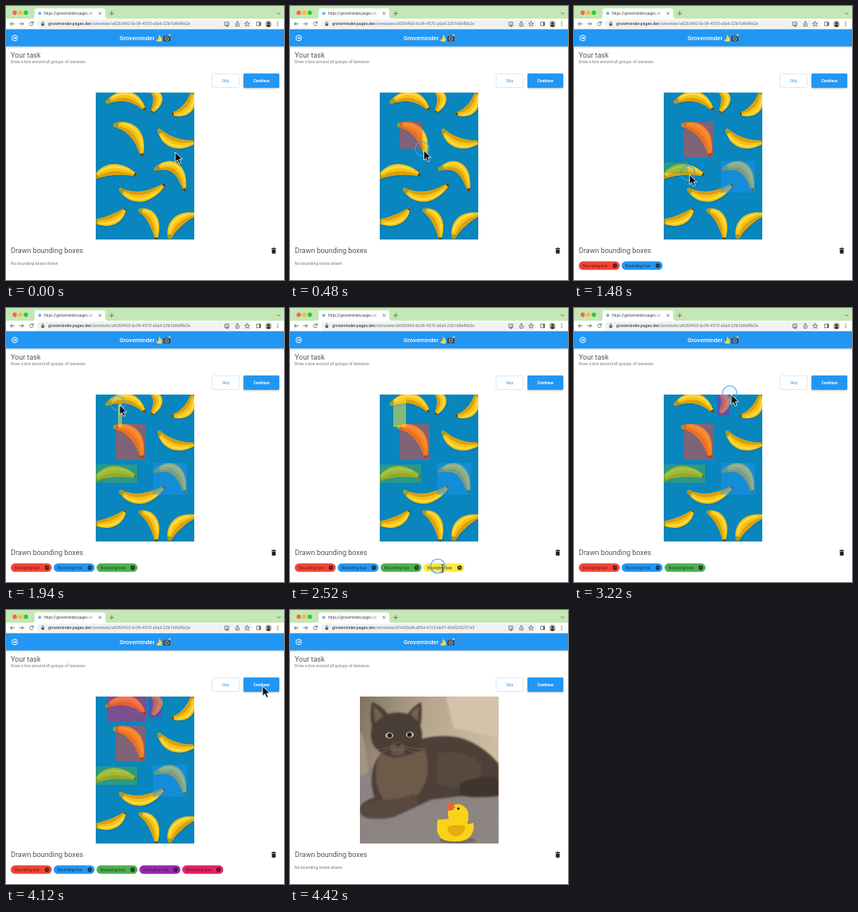
An HTML page that plays this animation: 350x345 px, repeating every 4.48 s.

```html
<!DOCTYPE html>
<html lang="en">
<head>
<meta charset="utf-8">
<title>Annotation demo</title>
<style>
  html, body { margin: 0; width: 100%; height: 100%; overflow: hidden; background: #fff; }
  body > svg { display: block; width: 100vw; height: 100vh; }
  text { font-family: Roboto, sans-serif; }
  .body { font-size: 5px; letter-spacing: .08px; fill: #777; }
  .head { font-size: 9px; fill: #555; }
  .line { fill: none; stroke: #5f6368; stroke-width: .8; stroke-linecap: round; stroke-linejoin: round; }
</style>
</head>
<body>
<svg viewBox="0 0 350 345">
  <defs>
    <filter id="drop" x="-10%" y="-20%" width="120%" height="160%">
      <feDropShadow dx="0" dy=".8" stdDeviation=".8" flood-opacity=".3"/>
    </filter>
    <filter id="soft"><feGaussianBlur stdDeviation=".8"/></filter>
    <pattern id="knit" width="5" height="4" patternUnits="userSpaceOnUse" patternTransform="rotate(-28)">
      <rect width="5" height="4" fill="#928a87"/>
      <path d="M0 1h5M1 0v4" stroke="#7f7775" stroke-width=".8"/>
    </pattern>
    <linearGradient id="wall" x2="1" y2=".3">
      <stop stop-color="#7f7264"/><stop offset=".45" stop-color="#b6a58d"/><stop offset="1" stop-color="#cdbda3"/>
    </linearGradient>
    <linearGradient id="fade" x1="100" x2="113" gradientUnits="userSpaceOnUse">
      <stop stop-color="#fff" stop-opacity="0"/><stop offset="1" stop-color="#fff"/>
    </linearGradient>
  </defs>

  <!-- browser -->
  <rect width="350" height="345" fill="#fff"/>
  <rect width="350" height="16" fill="#c4e7b5"/>
  <circle cx="11" cy="8.5" r="2.7" fill="#fe5f57"/>
  <circle cx="18" cy="8.5" r="2.7" fill="#febc2e"/>
  <circle cx="25" cy="8.5" r="2.7" fill="#28c840"/>
  <path d="M33 16q3 0 3-3V6q0-3 3-3h83q3 0 3 3v7q0 3 3 3z" fill="#fff"/>
  <circle cx="42.5" cy="9.3" r="2" fill="#6bb5ec"/>
  <text x="48" y="11" font-size="4.7" fill="#444">https://groveminder.pages.de</text>
  <path d="M100 4h15v11h-15z" fill="url(#fade)"/>
  <path class="line" d="M116.8 7.8l3 3m0-3l-3 3M130.5 9.3h5M133 6.8v5M341.2 8.3l2 2 2-2"/>
  <path class="line" d="M10.5 22.5h-5m2.2-2.2l-2.2 2.2 2.2 2.2M17 22.5h5m-2.2-2.2l2.2 2.2-2.2 2.2M34 21a2.4 2.4 0 1 0 .3 2.2M34.3 19.5v2h-2"/>
  <rect x="39" y="17.2" width="271" height="10.6" rx="5.3" fill="#eff1f3"/>
  <rect x="44.5" y="22" width="3.6" height="2.9" rx=".4" fill="#5f6368"/>
  <path class="line" d="M45.2 22v-1a1.1 1.1 0 0 1 2.2 0v1M276 20.3h4.5v4.5h-4.5zM278.3 22v4m-1.3-1.2l1.3 1.3 1.3-1.3M289.3 22v3.3h4V22M291.3 23.6v-4m-1.2 1.2l1.2-1.2 1.2 1.2"/>
  <path class="line" d="M303.5 19.6l.9 2 2.1.2-1.6 1.4.5 2.1-1.9-1.1-1.9 1.1.5-2.1-1.6-1.4 2.1-.2z"/>
  <path class="line" d="M316 20.2h4.6v4.6H316z"/><path d="M318.6 20.2h2v4.6h-2z" fill="#5f6368"/>
  <circle cx="330.5" cy="22.5" r="3.9" fill="#b9aba2"/>
  <path d="M327.7 25.2a3 3 0 0 1 5.6 0 3.9 3.9 0 0 1-5.6 0z" fill="#383230"/><circle cx="330.5" cy="21.5" r="1.6" fill="#383230"/>
  <g fill="#5f6368"><circle cx="342" cy="20.3" r=".7"/><circle cx="342" cy="22.5" r=".7"/><circle cx="342" cy="24.7" r=".7"/></g>
  <text x="53" y="24.4" font-size="5.3" fill="#202124">groveminder.pages.dev<tspan id="path" fill="#6b6f74"></tspan></text>

  <!-- page -->
  <rect y="29.3" width="350" height="21.5" fill="#2196f3" filter="url(#drop)"/>
  <circle cx="11" cy="40.3" r="3.5" fill="none" stroke="#fff"/>
  <path d="M9 40.3h3.6m-1.4-1.5l1.5 1.5-1.5 1.5" fill="none" stroke="#fff" stroke-width=".9"/>
  <text x="143" y="43" font-size="7.7" font-weight="500" fill="#fff">Groveminder</text>
  <path d="M192 36l1.4-.4.6 2q3.8 4.5 1.6 7.2-4.2.8-7-1.5 4.2-1.6 3.8-5.3z" fill="#fbd548"/>
  <path d="M192 36l1.4-.4.4 1.6-1.2.4z" fill="#8a8b35"/>
  <rect x="198" y="38" width="9" height="6.5" rx="1" fill="#3d454d"/>
  <path d="M200 36.7h4l1 1.5h-6z" fill="#6b747c"/>
  <circle cx="202.5" cy="41.3" r="2.4" fill="#a9b9c5"/><circle cx="202.5" cy="41.3" r="1.5" fill="#2b4c6b"/>
  <path d="M206 34.8l.5 1.4 1.5.5-1.5.5-.5 1.5-.5-1.5-1.5-.5 1.5-.5z" fill="#ffe37a"/>
  <text class="head" x="6" y="65">Your task</text>
  <text class="body" x="6" y="72">Draw a box around all groups of bananas.</text>
  <rect x="259.5" y="85.5" width="34" height="17" rx="1" fill="#fff" stroke="#d5e4f1" stroke-width=".8"/>
  <text x="276.5" y="96" font-size="5" text-anchor="middle" font-weight="500" fill="#64b2f3">Skip</text>
  <rect x="299" y="85" width="45" height="18" rx="1.2" fill="#2196f3" filter="url(#drop)"/>
  <text x="321.5" y="96" font-size="5" text-anchor="middle" font-weight="700" fill="#fff">Continue</text>
  <text class="head" x="6" y="311">Drawn bounding boxes</text>
  <path d="M334.3 305h1.5l.5-.7h1.6l.5.7h1.5v.9h-5.6zM334.7 306.4h4.8v4.6q0 .8-.8.8h-3.2q-.8 0-.8-.8z" fill="#222"/>
  <text class="body" id="none" x="6" y="326">No bounding boxes drawn</text>

  <svg id="fruit" x="113" y="109" width="124" height="185" viewBox="113 109 124 185">
    <rect x="113" y="109" width="124" height="185" fill="#0886bd"/>
  </svg>

  <svg id="cat" x="88" y="109" width="174.500" height="185" viewBox="88 109 174.500 185">
    <rect x="88" y="109" width="175" height="186" fill="url(#wall)"/>
    <g filter="url(#soft)">
      <path d="M196 109l10 40 60 12v-60z" fill="#d2c3aa"/>
      <path d="M86 205l30-12 90-6 60 5v105H86z" fill="url(#knit)"/>
      <path d="M86 150q10 10 12 55l-12 6z" fill="#a39584"/>
      <path d="M158 164q44-12 72 3 25 14 36 32v33q-18 5-38 1l-50 6-48 22q-30 6-42-7-3-11 18-18-9-30 5-51z" fill="#4d4037"/>
      <path d="M113 180q30 10 57-5 10 34-8 57-22 12-44 7-17-24-5-59z" fill="#6d5a4a"/>
      <path d="M185 181q32-8 55 12 7 20-20 28-24 6-35-4z" fill="#57493e"/>
      <path d="M88 253q6-13 35-14 20-2 33-8l6 12q-24 19-55 20-19 0-19-10z" fill="#594a40"/>
      <path d="M214 218q30-12 52-6v22q-30 4-52 0z" fill="#3f342e"/>
      <path d="M103 116q11 3 20 15 13-4 25 0 7-10 17-15 2 16-1 30 6 16-4 27-13 12-25 13-18-1-28-13-8-10-4-27-3-15 0-30z" fill="#4a3d35"/>
      <path d="M105 121q8 5 12 13l-10 8zM162 121q-7 4-10 11l9 8z" fill="#75604f"/>
      <path d="M126 171q9-9 19 0l-2 10q-8 5-15 0z" fill="#66554a"/>
      <path d="M132 168h8l-4 4z" fill="#2b2422"/>
    </g>
    <g fill="#b5bea0"><ellipse cx="125" cy="158" rx="5" ry="3.700"/><ellipse cx="151" cy="157" rx="5" ry="3.700"/></g>
    <circle cx="125.500" cy="158" r="2.800" fill="#181b1c"/><circle cx="150.500" cy="157" r="2.800" fill="#181b1c"/>
    <path d="M129 176q4 3 7-2 4 5 8 1M127 173l-25 4M127 175l-23 9M145 173l25 2M145 175l23 8" fill="none" stroke="#9b8876" stroke-width=".4"/>
    <ellipse cx="211" cy="290" rx="23" ry="4" fill="#655e59" opacity=".6"/>
    <path d="M186 264q-4 21 9 26 18 4 29-2 9-8 7-20l-8 2q4-13-1-20-9-9-18-3-8 6-4 16z" fill="#fbd219"/>
    <path d="M198 273q12-4 23-1-2 13-13 13-9-1-10-12z" fill="#e6ae0b"/>
    <path d="M208 248q-8-9-10-4 1 4-2 6 6 5 10 1z" fill="#f0642c"/>
    <circle cx="212" cy="250" r="1.500" fill="#282018"/>
  </svg>

  <g id="boxes"></g>
  <g id="chips"></g>
  <g id="mouse">
    <circle id="ring" r="9" fill="#2196f3" fill-opacity=".06" stroke="#4c9fe0" stroke-width="1.1"/>
    <path id="arrow" d="M2 2v12.500l2.900-2.700 2 4.600 2.300-1-2-4.500h4z" fill="#111" stroke="#fff" stroke-width=".8"/>
    <path id="beam" d="M4.500-2q1.500 0 1.500 1v8q0 1-1.500 1M7.500-2Q6-2 6-1M6 7q0 1 1.500 1" fill="none" stroke="#222" stroke-width=".9"/>
  </g>
</svg>
<script>
const LOOP = 4480, NEXT_PAGE = 4260;
const $ = id => document.getElementById(id);
const add = (parent, tag, attrs, text) => {
  const el = document.createElementNS('http://www.w3.org/2000/svg', tag);
  for (const k in attrs) el.setAttribute(k, attrs[k]);
  if (text) el.textContent = text;
  return parent.appendChild(el);
};
const show = (el, on) => el.setAttribute('visibility', on ? 'visible' : 'hidden');

// stem, middle, tip, width
const bananas = [
  [126, 122, 153, 114, 175, 131, 13], [135, 150, 161, 159, 171, 189, 14],
  [182, 107, 191, 117, 183, 134, 12], [235, 106, 229, 128, 209, 136, 13],
  [192, 155, 211, 172, 239, 171, 13], [187, 206, 213, 204, 225, 233, 13],
  [111, 217, 135, 206, 164, 213, 14], [143, 230, 170, 240, 200, 224, 13],
  [110, 271, 134, 269, 150, 255, 13], [167, 257, 184, 268, 189, 294, 13],
  [206, 293, 216, 272, 240, 262, 14]
];

function drawBanana([ax, ay, mx, my, bx, by, w]) {
  const cx = 2 * mx - (ax + bx) / 2, cy = 2 * my - (ay + by) / 2;
  const side = Math.sign((bx - ax) * (my - ay) - (by - ay) * (mx - ax));
  const at = (t, k) => {
    const u = 1 - t;
    const dx = u * (cx - ax) + t * (bx - cx), dy = u * (cy - ay) + t * (by - cy);
    const h = k * side * w / 2 * Math.sin(Math.PI * (.05 + .91 * t)) ** .75 / Math.hypot(dx, dy);
    return [u * u * ax + 2 * u * t * cx + t * t * bx - dy * h,
            u * u * ay + 2 * u * t * cy + t * t * by + dx * h].map(v => v.toFixed(1)).join();
  };
  const strip = (k1, k2, t0 = 0, t1 = 1) => {
    const ts = Array.from({ length: 17 }, (_, i) => t0 + (t1 - t0) * i / 16);
    return [...ts.map(t => at(t, k1)), ...ts.reverse().map(t => at(t, k2))].join(' ');
  };
  const poly = (points, fill, more) => add($('fruit'), 'polygon', { points, fill, ...more });
  poly(strip(1, -1), '#05608e', { opacity: .35, transform: 'translate(1 1.5)' });
  poly(strip(1, -1), '#f5c416');
  poly(strip(-.3, -1), '#dc9f0d');
  poly(strip(.65, .3, .15, .85), '#ffdc4a');
  poly(strip(1, -1, 0, .1), '#a99a22');
  poly(strip(1, -1, .96, 1), '#55441b');
}
bananas.forEach(drawBanana);

// time, x, y, pressed until the next key
const keys = [
  [0, 211, 182, 0], [240, 138, 146, 1], [560, 176, 191, 0],
  [780, 185, 195, 1], [1080, 228, 235, 0],
  [1340, 113, 197, 1], [1580, 165, 220, 0],
  [1800, 146, 150, 1], [1940, 141, 120, 1], [2040, 130, 115, 0],
  [2440, 186, 325, 0], [2480, 186, 325, 1], [2560, 186, 325, 0],
  [2660, 214, 327, 1], [2720, 214, 327, 0],
  [3000, 180, 135, 1], [3220, 196, 107, 1], [3260, 196, 107, 0],
  [3440, 127, 140, 1], [3640, 177, 105, 1], [3680, 177, 105, 0],
  [4120, 321, 94, 0], [4160, 321, 94, 1], [4220, 321, 94, 0], [LOOP, 321, 94, 0]
];

function pointer(t) {
  const i = keys.findIndex((k, n) => n + 1 === keys.length - 1 || t < keys[n + 1][0]);
  const [t0, x0, y0, down] = keys[i], [t1, x1, y1] = keys[i + 1];
  let p = Math.min(1, (t - t0) / (t1 - t0));
  if (!down) p = p * p * (3 - 2 * p);
  return { x: x0 + (x1 - x0) * p, y: y0 + (y1 - y0) * p, down };
}

const boxes = [
  { from: 240, to: 560, color: '#f44336' },
  { from: 780, to: 1080, color: '#2196f3' },
  { from: 1340, to: 1580, color: '#4caf50' },
  { from: 1800, to: 2040, color: '#ffeb3b', gone: 2720 },
  { from: 3000, to: 3260, color: '#9c27b0' },
  { from: 3440, to: 3680, color: '#e91e63' }
];
for (const b of boxes) {
  b.rect = add($('boxes'), 'rect', { fill: b.color, opacity: .5 });
  b.chip = add($('chips'), 'g', {});
  add(b.chip, 'rect', { x: 6, y: 321.5, width: 51.5, height: 10.8, rx: 5.4, fill: b.color });
  add(b.chip, 'text', { x: 11, y: 328.7, 'font-size': 5, 'letter-spacing': .08, fill: '#222', 'fill-opacity': .85 }, 'Bounding box');
  add(b.chip, 'circle', { cx: 51.5, cy: 327, r: 2.7, fill: '#222' });
  add(b.chip, 'path', { d: 'M50.400 325.900l2.200 2.200m0-2.200l-2.200 2.200', stroke: b.color, 'stroke-width': .7 });
}

const clampX = x => Math.max(113, Math.min(237, x));
const clampY = y => Math.max(109, Math.min(294, y));

function render(t) {
  const next = t >= NEXT_PAGE;
  let slot = 0;
  for (const b of boxes) {
    const live = !next && t >= b.from && t < (b.gone || LOOP);
    const done = live && t >= b.to;
    show(b.rect, live);
    show(b.chip, done);
    if (live) {
      const a = pointer(b.from), c = pointer(Math.min(t, b.to));
      const x = clampX(c.x), y = clampY(c.y);
      const size = { x: Math.min(a.x, x), y: Math.min(a.y, y), width: Math.abs(x - a.x), height: Math.abs(y - a.y) };
      for (const k in size) b.rect.setAttribute(k, size[k]);
    }
    if (done) b.chip.setAttribute('transform', `translate(${54 * slot++})`);
  }
  show($('none'), !slot);
  show($('fruit'), !next);
  show($('cat'), next);
  $('path').textContent = '/annotate/' + (next ? 'd1b62bd8-d85d-47c3-bb91-60ef236297e3' : 'a9260463-6c54-4570-a5a6-22b1b8ef6b2e');

  const m = pointer(t), onText = m.y > 318 && m.x < 205;
  $('mouse').setAttribute('transform', `translate(${m.x} ${m.y})`);
  show($('ring'), m.down && !next);
  show($('arrow'), !onText && !next);
  show($('beam'), onText && !next);
}

const start = performance.now();
function tick() {
  render(Math.floor((performance.now() - start) % LOOP / 20) * 20);
  requestAnimationFrame(tick);
}
tick();
</script>
</body>
</html>
```
